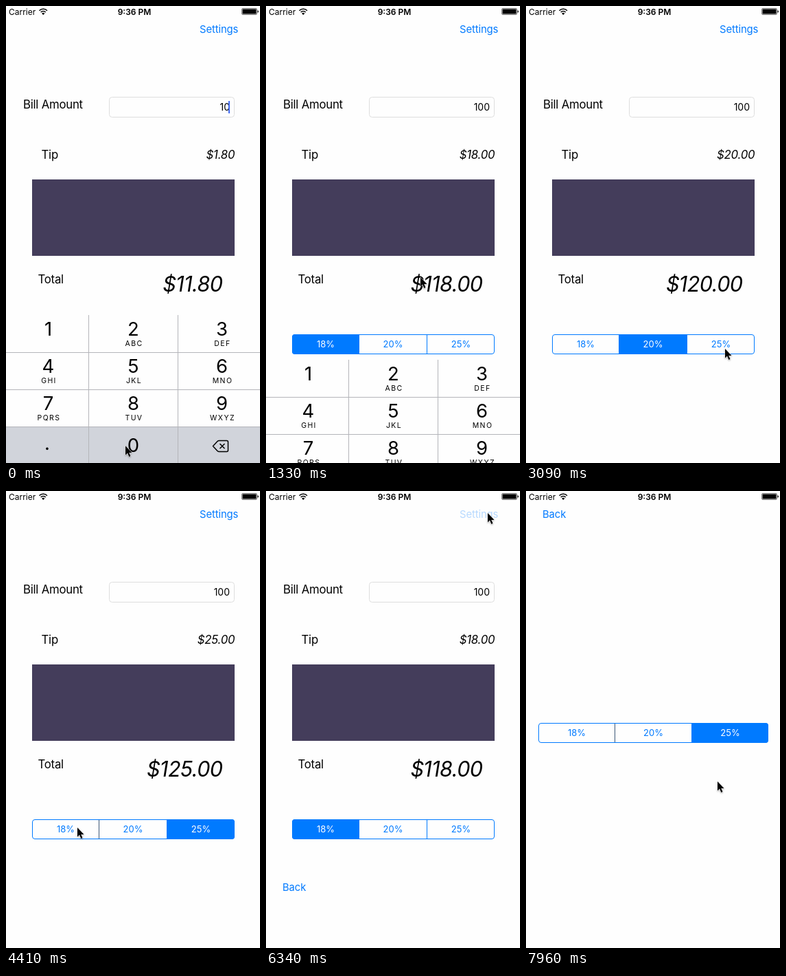
Recreate the animation shown at these times as an HTML page. Size 370 by 664 pixels, loop 8 s.

```html
<!DOCTYPE html>
<html lang="en">
<head>
<meta charset="utf-8">
<title>Tip calculator</title>
<style>
  html, body { margin: 0; width: 100%; height: 100%; overflow: hidden; background: #fefefe; }
  svg { display: block; width: 370px; height: 664px; font-family: Inter, Roboto, sans-serif; }
  .paper { fill: #fefefe; }
  .link { font-size: 14.8px; letter-spacing: -.1px; fill: #007aff; }
  .label { font-size: 16.8px; letter-spacing: -.25px; }
  .total { font-size: 30.5px; letter-spacing: -.55px; }
  .amount { font-size: 14px; }
  .italic { font-style: italic; }
  .bold { font-weight: 600; }
  .end { text-anchor: end; }
  .mid { text-anchor: middle; }
  .status { font-size: 12px; }
  .digit { font-size: 27.5px; }
  .letters { font-size: 10.5px; letter-spacing: 1.4px; }
  .segment { font-size: 13px; }
  .rule { stroke: #b4b5ba; }
  .line { fill: none; stroke: #000; stroke-width: 1.5; stroke-linejoin: round; }
</style>
</head>
<body>
<svg id="stage" viewBox="0 0 370 664"></svg>
<script>
const LOOP = 8000, TICK = 147;
const RATES = [18, 20, 25];

// The screen refreshes once per tick; these are the ticks at which taps land.
const TAP = { zero: 1, dismiss: 8, rate20: 17, rate25: 23, rate18: 33, settings: 42, default25: 50 };

// Each pointer move eases to (x, y), bowing downwards by sag.
const MOVES = [
  { from: TAP.zero, to: 8, x: 225, y: 394, sag: 0 },
  { from: 10, to: 16, x: 185, y: 492, sag: 40 },
  { from: TAP.rate20, to: 21, x: 290, y: 498, sag: 50 },
  { from: TAP.rate25, to: 30, x: 104, y: 489, sag: 84 },
  { from: TAP.rate18, to: 40, x: 323, y: 32, sag: 310 },
  { from: 43, to: 48, x: 272, y: 424, sag: 0 },
  { from: 48, to: TAP.default25, x: 291, y: 353, sag: 0 },
  { from: TAP.default25, to: 54, x: 279, y: 422, sag: 0 }
];

function ease(tick, from, duration) {
  const p = Math.min(1, Math.max(0, (tick - from) / duration));
  return p * p * (3 - 2 * p);
}

function pointerAt(tick) {
  let x = 174, y = 639;
  for (const step of MOVES) {
    const p = ease(tick, step.from, step.to - step.from);
    x += (step.x - x) * p;
    y += (step.y - y) * p + step.sag * Math.sin(Math.PI * p);
  }
  return [x, y];
}

const text = (x, y, cls, content, id = '') =>
  `<text x="${x}" y="${y}" class="${cls}" id="${id}">${content}</text>`;
const rect = (x, y, w, h, attrs = '') =>
  `<rect x="${x}" y="${y}" width="${w}" height="${h}" ${attrs}/>`;

function segments(id, top, edges) {
  const left = edges[0], width = edges[3] - left;
  const cells = RATES.map((rate, i) =>
    rect(edges[i], top, edges[i + 1] - edges[i], 29, 'data-cell')).join('');
  const names = RATES.map((rate, i) =>
    text((edges[i] + edges[i + 1] + 1) / 2, top + 19, 'segment mid', rate + '%')).join('');
  const dividers = [1, 2].map(i =>
    `<path data-divider d="M${edges[i] + .5} ${top + 1}v27"/>`).join('');
  return `<g id="${id}">
    <clipPath id="${id}Clip">${rect(left, top, width, 29, 'rx="4"')}</clipPath>
    <g clip-path="url(#${id}Clip)">${cells}</g>${dividers}
    ${rect(left + .5, top + .5, width - 1, 28, 'rx="3.5" fill="none" stroke="#007aff"')}
    ${names}</g>`;
}

function keyboard() {
  const letters = ['', 'ABC', 'DEF', 'GHI', 'JKL', 'MNO', 'PQRS', 'TUV', 'WXYZ'];
  const keys = letters.map((name, i) => {
    const x = 61.5 + 126.5 * (i % 3) - (i % 3 === 1 ? 2.5 : 0);
    const y = 479 + 54 * Math.floor(i / 3);
    return text(x, y, 'digit mid', i + 1) + text(x + 1, y + 15, 'letters mid', name);
  }).join('');
  return `<g id="keyboard">
    ${rect(0, 449, 370, 215, 'class="paper"')}
    ${rect(0, 612, 370, 52, 'fill="#d1d4db"')}
    ${rect(121, 612, 129, 52, 'id="zeroKey"')}
    <path class="rule" d="M0 503.5h370M0 557.5h370M0 611.5h370M120.5 449v215M250.5 449v215"/>
    ${keys}${text(185.5, 648, 'digit mid', 0)}${text(60, 645, 'digit mid', '.')}
    <path class="line" d="M301.5 639.5l6.5-7q1-1 2.5-1h11q2 0 2 2v12q0 2-2 2h-11q-1.5 0-2.5-1zM311.5 636l7 7m0-7l-7 7"/>
  </g>`;
}

const statusBar = `
  ${text(4, 12.5, 'status', 'Carrier')}
  ${text(187, 12.5, 'status bold mid', '9:36 PM')}
  <path class="line" d="M48.5 6.7a8 8 0 0 1 11.5 0M50.7 9a5 5 0 0 1 7.1 0"/>
  <path d="M54.25 13l-2.2-2.3a3.2 3.2 0 0 1 4.4 0z"/>
  ${rect(343.5, 3.5, 22, 9, 'rx="1.5" fill="none" stroke="#000" stroke-opacity=".5"')}
  ${rect(344.5, 4.5, 20, 7)}
  <path d="M366.5 6.2q1.5.3 1.5 1.8t-1.5 1.8z"/>`;

const stage = document.getElementById('stage');
stage.innerHTML = `
  ${rect(0, 0, 370, 664, 'class="paper"')}
  ${text(282, 38.5, 'link', 'Settings', 'settings')}
  ${text(25, 148.5, 'label', 'Bill Amount')}
  ${rect(150.5, 132.5, 182, 29, 'rx="4" fill="#fefefe" stroke="#dedede"')}
  ${text(326, 151.5, 'amount end', '', 'bill')}
  ${rect(324, 138, 2, 18, 'id="caret" fill="#426bf2"')}
  ${text(51.5, 221.5, 'label', 'Tip')}
  ${text(333.3, 221.5, 'label italic end', '', 'tip')}
  ${rect(38, 252, 295, 111, 'fill="#443d5b"')}
  ${text(46.5, 402.5, 'label', 'Total')}
  ${text(315.5, 415, 'total italic end', '', 'total')}
  ${segments('rates', 477, [38, 135, 234, 333])}
  ${keyboard()}
  <g id="sheet">
    ${rect(0, 0, 370, 664, 'class="paper"')}
    ${text(24, 38.5, 'link', 'Back')}
    ${segments('defaults', 337, [18, 129, 241, 353])}
  </g>
  ${statusBar}
  <path id="pointer" stroke="#fefefe" paint-order="stroke"
    style="filter:drop-shadow(0 1px 1px #0005)"
    d="M0 0v13.5l3-2.9 2.3 5.4 2.2-.9-2.3-5.2h4.3z"/>`;

const el = id => document.getElementById(id);
const set = (id, attr, value) => el(id).setAttribute(attr, value);
const move = (id, x, y) => set(id, 'transform', `translate(${x} ${y})`);
const dollars = value => '$' + value.toFixed(2);

function select(id, chosen, dividerColor) {
  const paint = (selector, attr, color) => el(id).querySelectorAll(selector)
    .forEach((node, i) => node.setAttribute(attr, color(i)));
  paint('[data-cell]', 'fill', i => i === chosen ? '#007aff' : '#fefefe');
  paint('text', 'fill', i => i === chosen ? '#fefefe' : '#007aff');
  paint('[data-divider]', 'stroke', i =>
    i === chosen || i + 1 === chosen ? '#007aff' : dividerColor);
}

function draw(time) {
  const tick = Math.floor(time / TICK);
  const bill = tick < TAP.zero ? 10 : 100;
  const chosen = tick < TAP.rate20 || tick >= TAP.rate18 ? 0 : tick < TAP.rate25 ? 1 : 2;
  const tip = bill * RATES[chosen] / 100;

  el('bill').textContent = bill;
  el('tip').textContent = dollars(tip);
  el('total').textContent = dollars(bill + tip);
  set('zeroKey', 'fill', tick < TAP.zero ? '#d1d4db' : '#fefefe');
  set('settings', 'opacity', tick < TAP.settings ? 1 : .28);
  set('caret', 'visibility', tick > TAP.dismiss ? 'hidden' : 'visible');
  select('rates', chosen, chosen === 2 ? '#3d5878' : '#007aff');
  select('defaults', tick < TAP.default25 ? 0 : 2, '#3d5878');
  move('keyboard', 0, Math.round(216 * ease(tick, TAP.dismiss, 2.75)));
  move('sheet', 0, Math.round(664 * (1 - ease(tick, TAP.settings, 3.65))));
  move('pointer', ...pointerAt(tick));
}

const start = performance.now();
function frame() {
  draw((performance.now() - start) % LOOP);
  requestAnimationFrame(frame);
}
frame();
</script>
</body>
</html>
```
